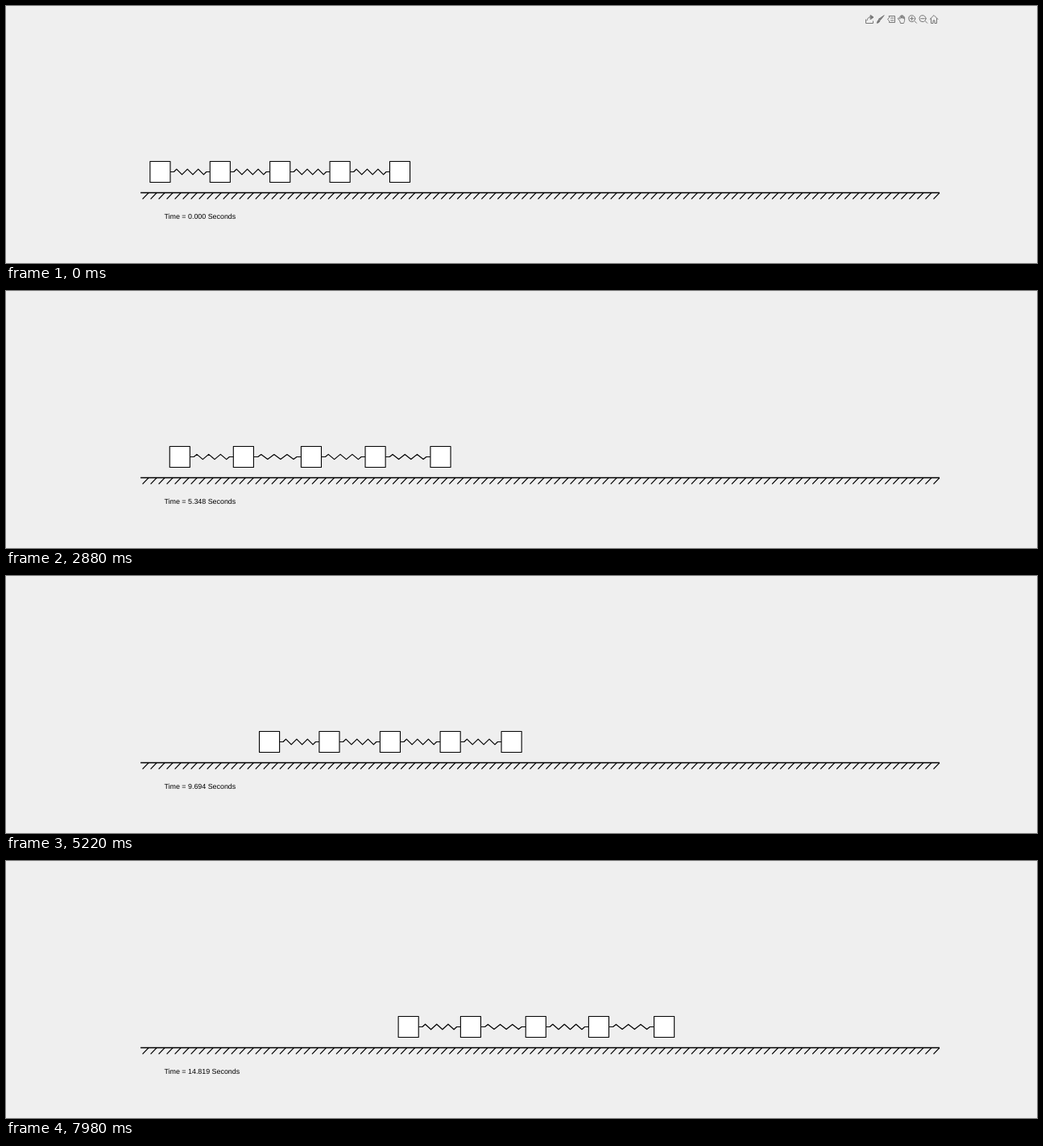
An HTML page that plays this animation: 1280 by 320 pixels, repeating every 8 s.

```html
<!DOCTYPE html>
<html lang="en">
<head>
<meta charset="utf-8">
<title>Chain of masses and springs</title>
<style>
  html, body { margin: 0; width: 100%; height: 100%; overflow: hidden; background: #efefef; }
  svg { display: block; width: 1280px; height: 320px; }
  text { font: 8.9px "Liberation Sans", Arial, sans-serif; text-rendering: geometricPrecision; }
  .line { fill: none; stroke: #000; stroke-linejoin: round; }
  #boxes { fill: #fff; }
  #tools { fill: none; stroke: #777; stroke-linejoin: round; stroke-linecap: round; }
  #tools .solid { fill: #777; }
</style>
</head>
<body>
<svg viewBox="0 0 1280 320">
  <g id="tools">
    <path d="M1067.5 17v4.5h9V19M1069 18c.5-3 2-4.5 5-4.5"/>
    <path class="solid" d="M1073.5 11.5l3.5 2.5-3.5 2.5z"/>
    <path class="solid" d="M1090 12l-4.500 5.500-1.500-1.200zM1083.500 17l1.500 1.300c-.5 2-2 3-4 2.800 1-.8.8-3 2.500-4.100z"/>
    <path d="M1096.5 12.500h7v8h-7v-2l-2-2 2-2zM1098.500 15h3.500M1098.500 18h3.500"/>
    <path d="M1109.500 18.500l-2-2.500c-.5-1 .7-1.600 1.400-.8l1 1v-3c0-1 1.400-1 1.400 0v2-3c0-1 1.500-1 1.500 0v3-2.500c0-1 1.400-1 1.400 0v3-1.500c0-1 1.400-1 1.400 0v3c0 2-.6 2.800-1.200 4.300h-3.500z"/>
    <path d="M1128 18.800l2.500 2.500M1122.500 15.700h4.400M1124.700 13.500v4.400"/><circle cx="1124.700" cy="15.700" r="4"/>
    <path d="M1141.300 18.800l2.500 2.500M1135.800 15.700h4.400"/><circle cx="1138" cy="15.700" r="4"/>
    <path d="M1147 16.500l5-5 5 5M1148.500 15.500v6h2.500v-3.500h2v3.500h2.500v-6"/>
  </g>
  <path id="ground" class="line" stroke-width="1.5"/>
  <path id="hatch" class="line" stroke-width="1.3"/>
  <path id="springs" class="line" stroke-width="1.2"/>
  <path id="boxes" class="line" stroke-width="1.1"/>
  <text id="clock" x="196.5" y="265.3"></text>
</svg>
<script>
const LOOP = 8000, STEP = 60, COUNT = 134;
const DT = 40 / 359;                        // simulated seconds per step
const HOME = 191.4, GAP = 74.4;             // rest positions of the box centres
const WIDTH = 25.1, HEIGHT = 26, MID = 206.5;
const FLOOR = 232.6, LEFT = 167, RIGHT = 1159, TICKS = 99;

// The chain starts at rest; a constant force pulls its last mass to the right
const mass = [1, 2, 1.9, 2.8, 4.9];
const stiff = [2.1, 2.02, 4.8, 4.1];
const pull = 36.8;

function simulate() {
  const sub = 40, h = DT / sub;
  const x = mass.map(() => 0), v = [...x], poses = [];
  for (let n = 0; n < COUNT; n++) {
    poses.push(x.map((d, i) => HOME + GAP * i + d));
    for (let s = 0; s < sub; s++) {
      const force = stiff.map((k, i) => k * (x[i + 1] - x[i]));
      force.push(pull);
      mass.forEach((m, i) => { v[i] += h * (force[i] - (force[i - 1] || 0)) / m; });
      v.forEach((speed, i) => { x[i] += h * speed; });
    }
  }
  return poses;
}

function spring(a, b) {
  const len = b - a, lead = len * 0.091, part = (len - 2 * lead) / 6;
  const amp = 3.4 - 0.05 * (len - 49.3);
  let d = `M${a} ${MID}H${a + lead}`;
  for (let i = 0; i < 6; i++) {
    d += `L${a + lead + part * (i + 0.5)} ${MID + (i % 2 ? amp : -amp)}`;
  }
  return d + `L${b - lead} ${MID}H${b}`;
}

const box = x => `M${x - WIDTH / 2} ${MID - HEIGHT / 2}h${WIDTH}v${HEIGHT}h${-WIDTH}z`;
const el = id => document.getElementById(id);
const setPath = (id, d) => el(id).setAttribute("d", d);

setPath("ground", `M${LEFT} ${FLOOR}H${RIGHT}`);
setPath("hatch", Array.from({ length: TICKS }, (_, i) =>
  `M${LEFT + (RIGHT - LEFT) / TICKS * (i + 1)} ${FLOOR}l-7.5 7.8`).join(""));

const poses = simulate();
let shown = -1;

function draw(n) {
  if (n === shown) return;
  shown = n;
  const c = poses[n];
  setPath("boxes", c.map(box).join(""));
  setPath("springs", c.slice(1).map((x, i) =>
    spring(c[i] + WIDTH / 2, x - WIDTH / 2)).join(""));
  el("clock").textContent = `Time = ${(n * DT).toFixed(3)} Seconds`;
  el("tools").style.display = n ? "none" : "";
}

const start = performance.now();
function tick() {
  const t = (performance.now() - start) % LOOP;
  draw(Math.min(COUNT - 1, Math.floor(t / STEP)));
  requestAnimationFrame(tick);
}
draw(0);
requestAnimationFrame(tick);
</script>
</body>
</html>
```
